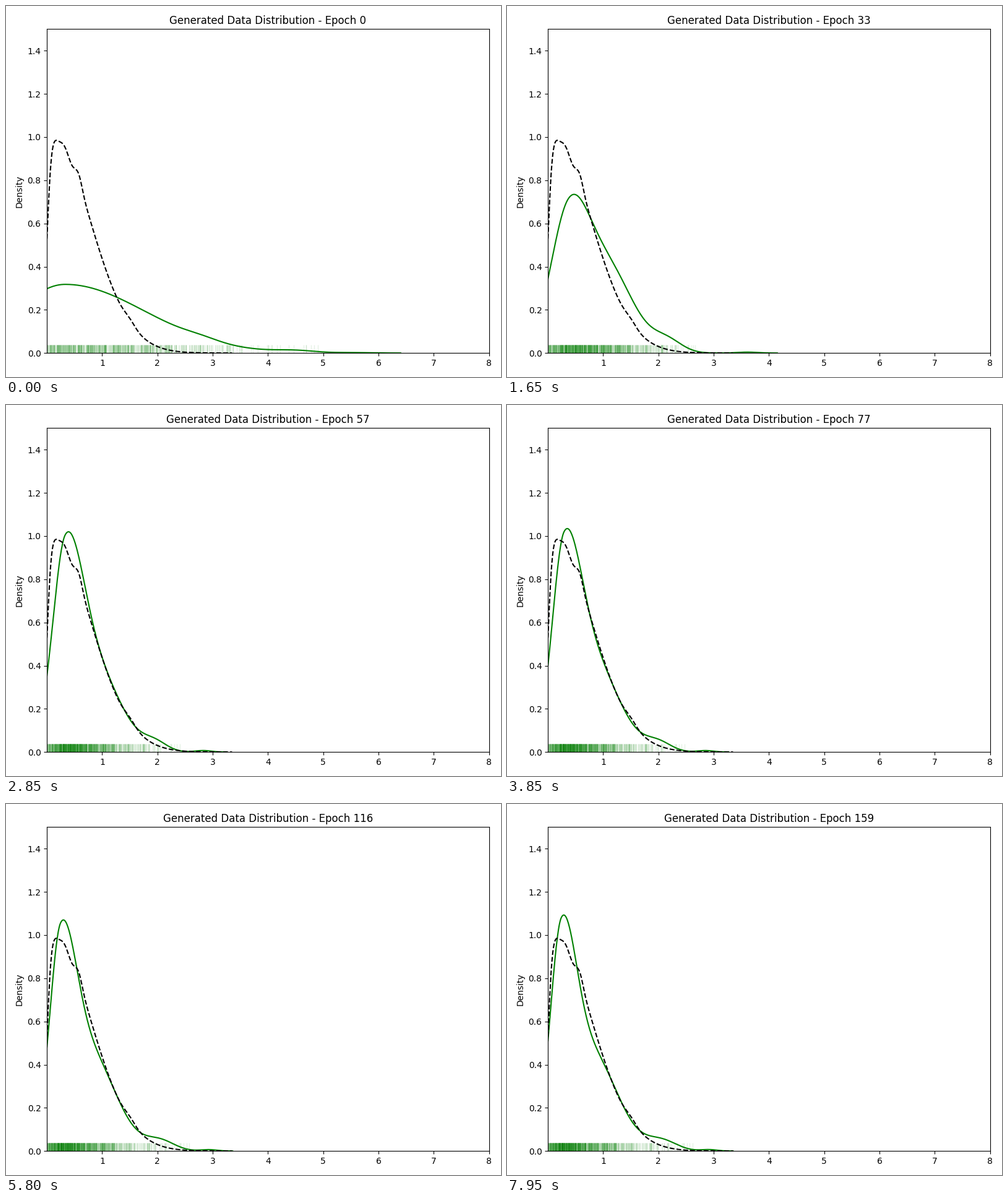
Write a matplotlib script that moves like this. It is 800 px wide and 600 px high and loops after 8000 ms.

```python
import numpy as np
import matplotlib.pyplot as plt
from matplotlib.animation import FuncAnimation
from matplotlib.collections import LineCollection

FRAMES, INTERVAL = 160, 50
SAMPLES = 1000

# Key poses of the generated density:
# epoch, curve end, body (height, centre, left, right widths),
# shoulder (height, centre, width), tail (height, centre, width)
POSES = np.array([
    (0, 6.40, .318, .33, .915, 1.45, .010, 2.80, .30, .009, 4.50, .35),
    (17, 5.52, .462, .53, .530, .50, .236, 1.655, .60, .022, 3.20, .50),
    (33, 4.15, .597, .37, .330, .36, .379, 1.08, .465, .055, 2.15, .27),
    (57, 3.25, .800, .33, .228, .31, .379, .85, .47, .040, 1.95, .22),
    (97, 3.30, .810, .25, .194, .285, .432, .78, .46, .048, 2.02, .26),
    (136, 3.43, .850, .24, .195, .26, .445, .78, .47, .048, 2.05, .28),
    (159, 3.35, .850, .24, .195, .26, .445, .78, .47, .048, 2.05, .28),
])


def hump(x, height, centre, left, right=None):
    """Bell curve with its own width on each side."""
    width = np.where(x < centre, left, right or left)
    return height * np.exp(-((x - centre) / width) ** 2 / 2)


def generated(x, epoch):
    """Height of the generated density and the x where its curve ends."""
    end, *p = [np.interp(epoch, POSES[:, 0], col) for col in POSES.T[1:]]
    y = hump(x, *p[:4]) + hump(x, *p[4:7]) + hump(x, *p[7:])
    y += hump(x, .075 / end ** 2, .87 * end, .045 * end)
    return y, end


def real(x):
    """Smoothed half-normal with a few sampling ripples."""
    y = 1.06 * np.exp(-(x / .75) ** 2 / 2) * (1 + np.tanh(x / .0875)) / 2
    ripples = [(-.03, .2, .07), (-.02, .43, .06), (.04, .58, .06),
               (.017, 1.5, .1)]
    return y + sum(hump(x, *r) for r in ripples)


grid = np.linspace(0, 6.5, 651)
ranks = np.random.default_rng(7).random(SAMPLES)


def samples(y):
    """Place each rank by the mass to its right; the rest fall below zero."""
    mass = np.cumsum(y[::-1]) * grid[1]
    return np.interp(ranks, mass, grid[::-1], right=-1)


fig, ax = plt.subplots(figsize=(8, 6), dpi=100)
ax.set_xlim(0.001, 8)
ax.set_ylim(0, 1.5)
ax.set_ylabel("Density")
title = ax.set_title("Generated Data Distribution - Epoch 0")

rug = LineCollection([], colors="green", linewidths=1, alpha=0.1,
                     transform=ax.get_xaxis_transform())
ax.add_collection(rug, autolim=False)
fake, = ax.plot([], [], color="green", lw=1.5)
real_x = np.linspace(0, 3.35, 336)
ax.plot(real_x, real(real_x), "k--", lw=1.5)
# The slightly wide rect settles half-pixel rounding of centred text
fig.tight_layout(rect=(0, 0, 1.0001, 1))


def draw(epoch):
    y, end = generated(grid, epoch)
    shown = grid <= end
    fake.set_data(grid[shown], y[shown])
    rug.set_segments([[(x, 0), (x, 0.025)] for x in samples(y * shown)])
    title.set_text(f"Generated Data Distribution - Epoch {epoch}")
    return fake, rug, title


anim = FuncAnimation(fig, draw, frames=FRAMES, interval=INTERVAL,
                     repeat=True, repeat_delay=0)
plt.show()
```
